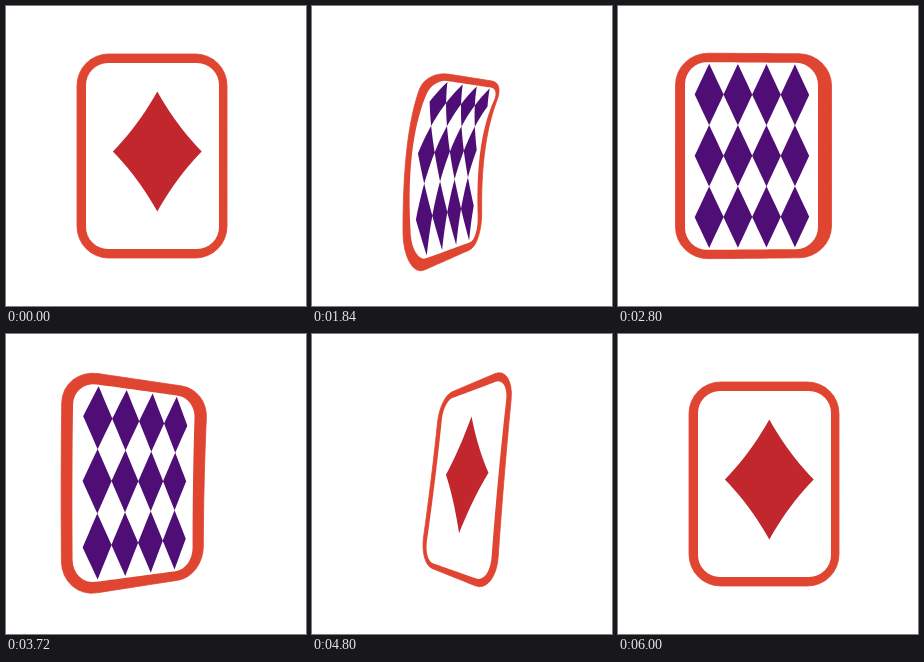
An HTML page for the animation above (6040 ms loop, 300 by 300 pixels).

```html
<!DOCTYPE html>
<html lang="en">
<head>
<meta charset="utf-8">
<title>Turning card</title>
<style>
  html, body { margin: 0; width: 100%; height: 100%; overflow: hidden; background: #fff; }
  svg { display: block; width: 100vw; height: 100vh; }
</style>
</head>
<body>
<svg viewBox="0 0 300 300">
  <path id="border" fill="#e04531" stroke="#e04531" stroke-width="0.8" stroke-linejoin="round"/>
  <path id="panel" fill="#fff"/>
  <path id="suit" fill="#c1272d"/>
  <path id="pattern" fill="#4f0e76"/>
</svg>
<script>
const LOOP = 6040, STEP = 40, HALF = 3000;

// A card side: top point, bottom point and how far its middle control bends away.
const side = (x0, y0, x1, y1, bendX = 0, bendY = 0) =>
  [x0, y0, (x0 + x1) / 2 + bendX, (y0 + y1) / 2 + bendY, x1, y1];
const upright = (x, top, bottom) => side(x, top, x, bottom);

// Each pose: time, border sides, panel sides (the front's left side comes first).
const poses = [
  [0, upright(71, 48, 252), upright(221, 48, 252),
      upright(80, 57, 243), upright(213, 57, 243)],
  [760, upright(85.5, 55, 243), upright(218, 38, 262),
        upright(91, 63, 238), upright(209, 49, 251)],
  [960, side(99, 58, 96, 231, 6), side(205.5, 34, 204, 262),
        side(103, 64, 101, 229, 5), side(197, 47, 196, 251)],
  [1280, side(140, 65, 113, 230, 0, -6), side(201, 32, 175, 260, -4, -8),
         side(143, 69, 117, 226, 0, -6), side(196, 43, 170, 249, -4, -8)],
  [1480, side(181, 72, 135, 234, -14, -18), side(190, 44, 141, 265, -18, -22),
         side(179, 76, 137, 228, -14, -18), side(184, 54, 141, 252, -16, -20)],
  [1680, side(205, 95, 152.5, 235, -33, -44), side(178, 96, 110, 273, -53, -72),
         side(198, 98, 150, 229, -28, -41), side(178, 98, 115, 258, -48, -56)],
  [1840, side(193, 77, 171, 238, -18, -28), side(116, 65, 92, 273, -18, -54),
         side(188, 83, 167, 233, -18, -28), side(122, 73, 101, 257, -23, -34)],
  [2200, side(200, 58, 194, 241, -4, -6), side(60, 35, 58, 266, -3, -8),
         side(188, 66, 184, 234, -3, -6), side(71, 48, 69, 252, -3, -6)],
  [2800, upright(213.5, 48, 251.5), upright(57.5, 47, 253),
         upright(200, 57, 243), upright(67, 56, 244)],
  [3000, upright(214.5, 48, 252), upright(57, 48, 252),
         upright(201, 57, 243), upright(67, 57, 243)]
].map(([time, ...sides]) => ({ time, values: sides.flat() }));

function slope(i, k) {
  if (i === 0 || i === poses.length - 1) return 0;
  const before = poses[i - 1], after = poses[i + 1];
  return (after.values[k] - before.values[k]) / (after.time - before.time);
}

// Cubic Hermite blend between neighbouring poses.
function poseAt(time) {
  let i = 0;
  while (i < poses.length - 2 && time >= poses[i + 1].time) i++;
  const a = poses[i], b = poses[i + 1], span = b.time - a.time;
  const s = (time - a.time) / span, r = 1 - s;
  const values = a.values.map((from, k) =>
    from * r * r * (1 + 2 * s) + b.values[k] * s * s * (3 - 2 * s) +
    span * s * r * (slope(i, k) * r - slope(i + 1, k) * s));
  return [0, 6, 12, 18].map(n => values.slice(n, n + 6));
}

const onSide = (c, v) => [0, 1].map(k =>
  (1 - v) * (1 - v) * c[k] + 2 * v * (1 - v) * c[k + 2] + v * v * c[k + 4]);

// Maps card coordinates (0..1) to the stage; the taller side is the nearer one.
function sheet(left, right) {
  const length = c => Math.hypot(c[4] - c[0], c[5] - c[1]);
  const ratio = length(right) / length(left);
  return ([u, v]) => {
    const w = u / (u + ratio * (1 - u));
    const p = onSide(left, v), q = onSide(right, v);
    return [p[0] + (q[0] - p[0]) * w, p[1] + (q[1] - p[1]) * w];
  };
}

// Subdivides a closed outline so that its straight runs can bend.
function subdivide(points) {
  return points.flatMap((p, i) => {
    const q = points[(i + 1) % points.length];
    const parts = Math.max(1, Math.ceil(Math.hypot(q[0] - p[0], q[1] - p[1]) / 0.04));
    return Array.from({ length: parts }, (_, n) =>
      [p[0] + (q[0] - p[0]) * n / parts, p[1] + (q[1] - p[1]) * n / parts]);
  });
}

function roundedRect(ru, rv) {
  const points = [];
  for (let corner = 0; corner < 4; corner++) {
    const cu = corner === 0 || corner === 3 ? 1 - ru : ru;
    const cv = corner < 2 ? 1 - rv : rv;
    for (let n = 0; n <= 8; n++) {
      const angle = (corner + n / 8) * Math.PI / 2;
      points.push([cu + ru * Math.cos(angle), cv + rv * Math.sin(angle)]);
    }
  }
  return subdivide(points);
}

// Four quadratic curves between neighbouring tips, pulled slightly inwards.
function concaveDiamond(cu, cv, ru, rv) {
  const tips = [[0, -1], [1, 0], [0, 1], [-1, 0]];
  const pull = 0.43;
  return tips.flatMap((a, i) => {
    const b = tips[(i + 1) % 4];
    return Array.from({ length: 10 }, (_, n) => {
      const s = n / 10, mid = 2 * s * (1 - s);
      const [x, y] = [0, 1].map(k =>
        a[k] * (1 - s) ** 2 + (a[k] + b[k]) * pull * mid + b[k] * s * s);
      return [cu + x * ru, cv + y * rv];
    });
  });
}

const borderShape = roundedRect(0.21, 0.155);
const panelShape = roundedRect(0.165, 0.118);
const suitShape = concaveDiamond(0.536, 0.476, 0.334, 0.323);
const patternShapes = [];
for (let row = 0; row < 3; row++) {
  for (let col = 0; col < 4; col++) {
    const u = 0.82 - col * 0.215, v = 0.172 + row * 0.327;
    patternShapes.push(subdivide(
      [[u, v - 0.164], [u + 0.108, v], [u, v + 0.164], [u - 0.108, v]]));
  }
}

const outline = (shape, map) =>
  "M" + shape.map(p => map(p).map(n => n.toFixed(2)).join(" ")).join("L") + "Z";
const setPath = (id, d) => document.getElementById(id).setAttribute("d", d);

function draw(elapsed) {
  const time = Math.floor((elapsed % LOOP) / STEP) * STEP;
  const turn = time <= HALF ? time : Math.max(0, 2 * HALF - time);
  const [borderLeft, borderRight, panelLeft, panelRight] = poseAt(turn);
  const panel = sheet(panelLeft, panelRight);
  const front = onSide(panelRight, 0.5)[0] > onSide(panelLeft, 0.5)[0];
  setPath("border", outline(borderShape, sheet(borderLeft, borderRight)));
  setPath("panel", outline(panelShape, panel));
  setPath("suit", front ? outline(suitShape, panel) : "");
  setPath("pattern", front ? "" : patternShapes.map(s => outline(s, panel)).join(""));
}

const start = performance.now();
function tick() {
  draw(performance.now() - start);
  requestAnimationFrame(tick);
}
tick();
</script>
</body>
</html>
```
